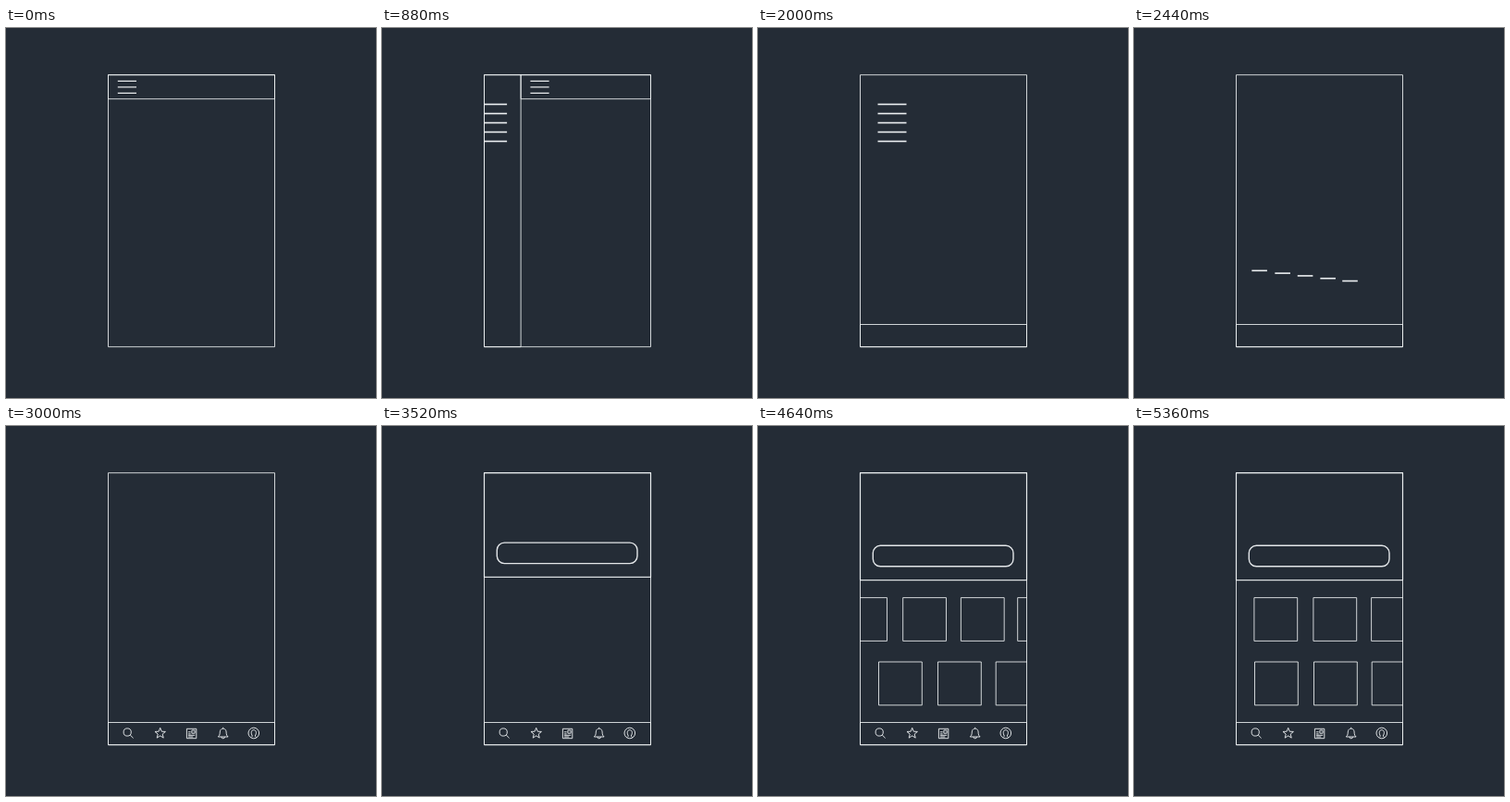
Write an HTML page with a canvas that moves like this. It is 400 by 400 pixels and loops after 6960 ms.

```html
<!DOCTYPE html>
<html lang="en">
<head>
<meta charset="utf-8">
<title>Wireframe</title>
<style>
html, body { margin: 0; width: 100%; height: 100%; overflow: hidden; background: #242c36; }
canvas { display: block; width: 400px; height: 400px; }
</style>
</head>
<body>
<canvas id="stage"></canvas>
<script>
const LOOP = 6960, STEP = 40;
const BG = '#242c36', INK = '#eef1f3';
const FRAME = { x: 110.5, y: 50.7, w: 180, h: 294 };
const TABS = [132, 166.7, 200.6, 234.7, 267.8];
const TAB_Y = 332;
const CARDS = [0, 64, 126.7, 188];

const canvas = document.getElementById('stage');
const ctx = canvas.getContext('2d');
const dpr = window.devicePixelRatio || 1;
canvas.width = canvas.height = 400 * dpr;

const mix = (a, b, p) => a + (b - a) * p;
const span = (t, a, b) => Math.min(1, Math.max(0, (t - a) / (b - a)));
const easeOut = p => 1 - (1 - p) ** 2;
const easeBoth = p => p < 0.5 ? 4 * p ** 3 : 1 - 4 * (1 - p) ** 3;

function style(width, alpha) {
  ctx.lineWidth = width;
  ctx.globalAlpha = alpha;
}
function line(...pts) {
  ctx.beginPath();
  for (let i = 0; i < pts.length; i += 2) ctx.lineTo(pts[i], pts[i + 1]);
  ctx.stroke();
}
function ring(x, y, r, from = 0, to = Math.PI * 2) {
  ctx.beginPath();
  ctx.arc(x, y, r, from, to);
  ctx.stroke();
}
function clipped(x, y, w, h, draw) {
  ctx.save();
  ctx.beginPath();
  ctx.rect(x, y, w, h);
  ctx.clip();
  draw();
  ctx.restore();
}

const icons = [
  function search() {
    ring(-0.8, -1, 4.1);
    line(2.2, 2, 5.6, 5.4);
  },
  function star() {
    ctx.beginPath();
    for (let i = 0; i < 10; i++) {
      const a = -Math.PI / 2 + i * Math.PI / 5, r = i % 2 ? 2.6 : 6;
      ctx.lineTo(r * Math.cos(a), 0.3 + r * Math.sin(a));
    }
    ctx.closePath();
    ctx.stroke();
  },
  function news() {
    ctx.strokeRect(-5.2, -4.7, 10.4, 10.4);
    ctx.strokeRect(0.3, -3, 3.2, 3.2);
    line(-3.6, -1.2, -1, -1.2);
    line(-3.6, 0.9, -1, 0.9);
    line(-3.6, 2.3, 3.6, 2.3);
    line(-3.6, 4, 1.6, 4);
  },
  function bell() {
    ctx.beginPath();
    ctx.moveTo(-5.4, 4);
    ctx.bezierCurveTo(-2.8, 2, -3.8, -0.5, -3.2, -2.4);
    ctx.bezierCurveTo(-2.4, -5.6, 2.4, -5.6, 3.2, -2.4);
    ctx.bezierCurveTo(3.8, -0.5, 2.8, 2, 5.4, 4);
    ctx.closePath();
    ctx.stroke();
    line(0, -6.2, 0, -4.8);
    ring(0, 4, 1.8, 0, Math.PI);
  },
  function profile() {
    ring(0, 0, 5.8);
    ctx.beginPath();
    ctx.moveTo(-2.9, 4.7);
    ctx.lineTo(-1.4, 3.2);
    ctx.bezierCurveTo(-3.4, 0, -2.8, -3.4, 0, -3.4);
    ctx.bezierCurveTo(2.8, -3.4, 3.4, 0, 1.4, 3.2);
    ctx.lineTo(2.9, 4.7);
    ctx.stroke();
  }
];

function drawFrame() {
  style(1, 0.85);
  ctx.strokeRect(FRAME.x, FRAME.y, FRAME.w, FRAME.h);
}

// Top bar with menu button, pushed aside by the drawer.
function drawTopBar(shift, alpha) {
  const x = FRAME.x + shift;
  style(1, 0.85 * alpha);
  ctx.strokeRect(x, FRAME.y, FRAME.w - shift, 26);
  style(1.2, alpha);
  for (let i = 0; i < 3; i++) line(x + 10.3, 57.4 + i * 6.5, x + 30.5, 57.4 + i * 6.5);
}

function drawDrawer(shift, alpha) {
  style(1, 0.85 * alpha);
  ctx.strokeRect(FRAME.x, FRAME.y, shift, FRAME.h);
}

// Each menu row travels to its tab and turns into an icon.
function drawItems(t, shift) {
  const p = easeBoth(span(t, 2040, 2720));
  const swap = span(t, 2440, 2720);
  TABS.forEach((tab, i) => {
    const x = mix(145 + shift - 65, tab, p);
    const y = mix(82.5 + 10 * i, TAB_Y, p);
    if (swap < 1) {
      const half = mix(15.5, 5.5, p);
      style(1.6, 1 - swap);
      line(x - half, y, x + half, y);
    }
    if (swap > 0) {
      ctx.save();
      ctx.translate(x, y);
      style(1, 0.9 * swap);
      icons[i]();
      ctx.restore();
    }
  });
}

function drawTabBar(p) {
  const y = mix(344.7, 320.5, p);
  style(1, 0.85);
  ctx.strokeRect(FRAME.x, y, FRAME.w, 344.7 - y);
}

function drawHero(p) {
  const y = mix(FRAME.y, 166.6, p);
  style(1.2, 0.9);
  ctx.strokeRect(FRAME.x, FRAME.y, FRAME.w, y - FRAME.y);
  clipped(110, 50, 181, y - 50, () => {
    style(1.4, 0.95);
    ctx.beginPath();
    ctx.roundRect(124.3, y - 37.3, 151.7, 22.5, 8);
    ctx.stroke();
  });
}

function drawCards(x, y) {
  clipped(110, 180, 181, 130, () => {
    style(1, 0.85);
    for (const c of CARDS) ctx.strokeRect(x + c, y, 46.8, 46.8);
  });
}

function render(now) {
  const t = Math.floor((now % LOOP) / STEP) * STEP;
  ctx.setTransform(dpr, 0, 0, dpr, 0, 0);
  ctx.globalAlpha = 1;
  ctx.fillStyle = BG;
  ctx.fillRect(0, 0, 400, 400);
  ctx.strokeStyle = INK;
  ctx.lineJoin = 'round';

  drawFrame();

  const shift = 65 * easeOut(span(t, 760, 1080));
  if (t < 1720) drawTopBar(shift, 1 - easeOut(span(t, 1440, 1720)));
  if (shift > 0 && t < 2000) drawDrawer(shift, 1 - span(t, 1480, 1760));
  if (shift > 0) clipped(110, 50, 181, 296, () => drawItems(t, shift));

  const bar = easeOut(span(t, 1720, 2000));
  if (bar > 0) drawTabBar(bar);

  const hero = easeOut(span(t, 3320, 3560));
  if (hero > 0) drawHero(hero);

  const rowA = 180 * (1 - easeOut(span(t, 3920, 4200)));
  const rowB = 180 * (1 - easeOut(span(t, 4200, 4480)));
  const scroll = 76 * (easeOut(span(t, 4560, 4840)) - easeOut(span(t, 5080, 5360)));
  if (t > 3920) drawCards(129.9 + rowA - scroll, 185.6);
  if (t > 4200) drawCards(130.5 + rowB, 255);
}

let start = null;
function tick(now) {
  if (start === null) start = now;
  render(now - start);
  requestAnimationFrame(tick);
}
requestAnimationFrame(tick);
</script>
</body>
</html>
```
